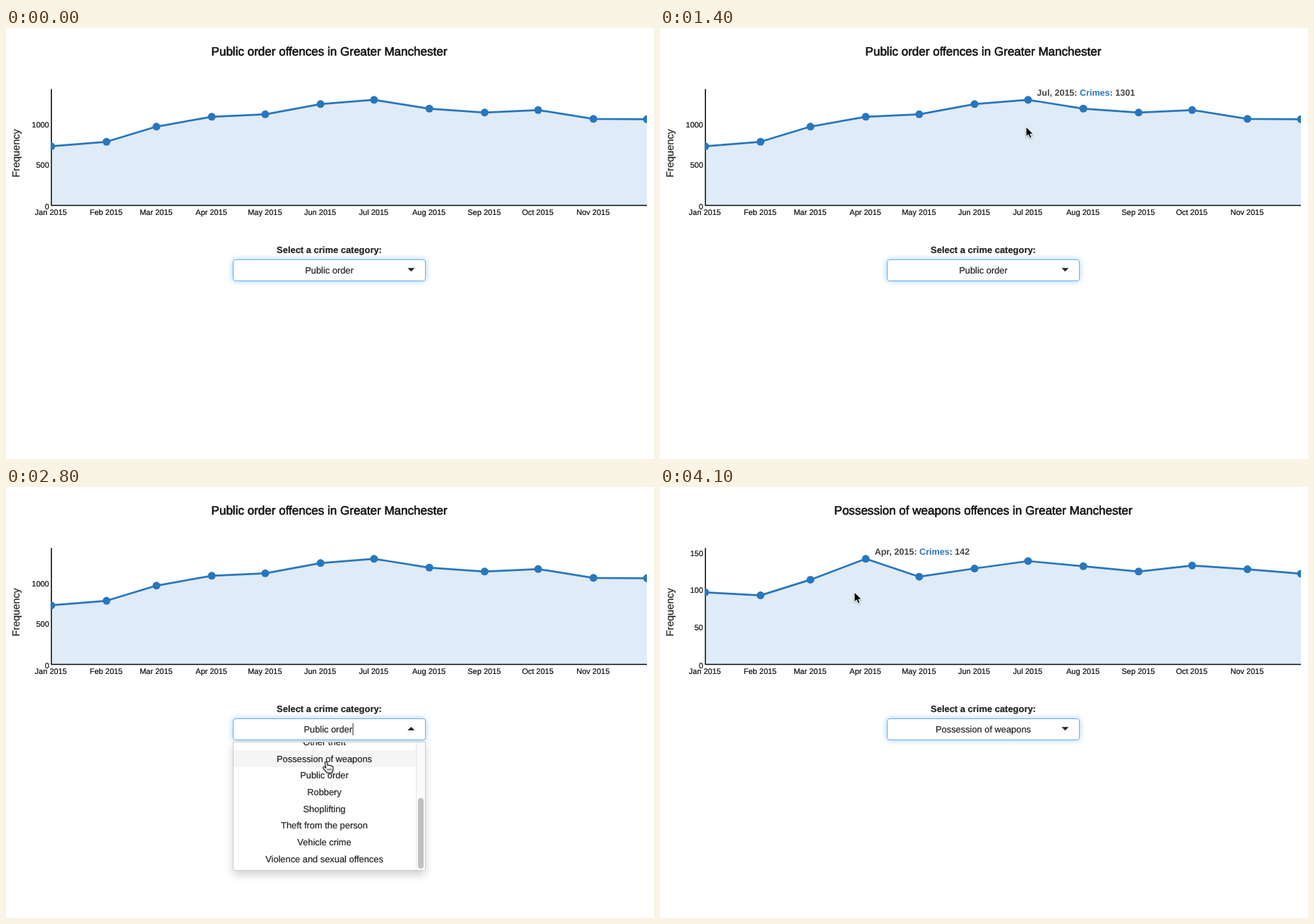
Write an HTML page that moves like this. It is 917 px wide and 611 px high and loops after 4200 ms.

```html
<!DOCTYPE html>
<html lang="en">
<head>
<meta charset="utf-8">
<title>Crime chart</title>
<style>
  html, body { margin: 0; width: 100%; height: 100%; overflow: hidden; background: #fff; }
  svg { display: block; font-family: "Liberation Sans", Arial, sans-serif; font-size: 12.85px; fill: #222; }
  text { text-rendering: geometricPrecision; stroke: #222; stroke-width: .2px; }
  .mid { text-anchor: middle; }
  .title { font-size: 17.05px; fill: #111; stroke: #111; stroke-width: .6px; text-anchor: middle; }
  .tick { font-size: 11px; fill: #000; }
  .end { text-anchor: end; }
  .label { font-size: 14.5px; text-anchor: middle; }
  .tip { font-size: 12.55px; font-weight: bold; fill: #444; stroke: none; }
  .tip tspan { fill: #2876bd; }
  .area { fill: rgba(40, 118, 198, .144); }
  .line { fill: none; stroke: #2876bd; stroke-width: 2.7; stroke-linejoin: round; }
  .dot { fill: #2876bd; }
  .axis { fill: none; stroke: #000; stroke-width: 1.5; }
  .box { fill: #fff; stroke: #66afe9; filter: drop-shadow(0 0 4px rgba(102, 175, 233, .6)); }
  .menu { fill: #fff; stroke: #ccc; filter: drop-shadow(0 6px 6px rgba(0, 0, 0, .175)); }
  #pointer { filter: drop-shadow(0 1px 1px rgba(0, 0, 0, .3)); }
</style>
</head>
<body>
<svg width="917" height="611" viewBox="0 0 917 611">
  <defs>
    <clipPath id="plot"><rect x="63.5" y="80" width="843.5" height="172"/></clipPath>
    <clipPath id="list"><rect x="321" y="362" width="273" height="181"/></clipPath>
  </defs>

  <text class="label" transform="translate(19 177.5) rotate(-90)">Frequency</text>
  <path class="axis" d="M64.3 86.5V251.5H907"/>
  <g id="charts"></g>
  <g id="months"></g>
  <g id="tips"></g>

  <text class="mid" x="457.5" y="319" font-size="12.95" font-weight="bold">Select a crime category:</text>
  <rect class="box" x="321.5" y="328.5" width="272" height="30" rx="3.5"/>
  <text id="before" class="mid" x="457.5" y="347.8">Public order</text>
  <text id="after" class="mid" x="457.5" y="347.8">Possession of weapons</text>
  <path id="down" d="M568.3 340.3h10l-5 5z"/>

  <g id="open">
    <text class="mid" x="455.7" y="347.8">Public order</text>
    <path d="M490.5 335h1v17h-1zM568.3 345h10l-5-5z"/>
    <path class="menu" d="M321.5 361.5H593.5V540a3.5 3.5 0 0 1-3.5 3.5H325a3.5 3.5 0 0 1-3.5-3.5z"/>
    <rect id="current" x="322" y="397" width="258" height="23.7" fill="#f5f5f5"/>
    <rect id="hover" x="322" y="373.3" width="258" height="23.7" fill="#f5f5f5"/>
    <g id="options" clip-path="url(#list)"></g>
    <path d="M580 362h13v178q0 3-3 3h-10z" fill="#fafafa"/>
    <path d="M580.5 362v181" stroke="#e8e8e8"/>
    <rect x="583" y="441" width="8" height="100" rx="4" fill="#c1c1c1"/>
  </g>

  <g id="pointer">
    <path id="arrow" d="M0 0V14L3.2 11.2 5.5 16.2 8 15.1 5.8 10.2H10.2z" fill="#000" stroke="#fff"/>
    <path id="beam" d="M-3-7Q0-7 0-5.5Q0-7 3-7M0-5.5V5.5M-3 7Q0 7 0 5.5Q0 7 3 7M-1.5 2h3" fill="none" stroke="#222" stroke-width="1.2"/>
    <g id="hand" fill="#fff" stroke="#111" stroke-width="1.1" stroke-linejoin="round">
      <path d="M-2.6 1.2C-3-.8-.3-1.2.2.8L1.2 5C2 3.8 4 4 4.2 5.2 5.5 4.3 7 4.8 7 6 8.4 5.6 9 6.6 9 8L8.6 11.5 7.5 15H0C-1 12.5-3.5 10.5-4.8 8.8-6 7-4 6-2.8 7L-1.2 8.4z"/>
      <path d="M1.6 9.2v3M3.8 9v3M6 9v3" stroke-width=".9"/>
    </g>
  </g>
</svg>

<script>
const LOOP = 4200, BASE = 251.8;
const names = 'Jan Feb Mar Apr May Jun Jul Aug Sep Oct Nov Dec'.split(' ');
const monthX = names.map((_, m) => 64 + 843 / 334 * (Date.UTC(2015, m) - Date.UTC(2015, 0)) / 864e5);
const order = {
  title: 'Public order', scale: 150 / 1301, ticks: [0, 500, 1000],
  data: [729, 785, 971, 1093, 1123, 1249, 1301, 1193, 1145, 1175, 1067, 1062]
};
const weapons = {
  title: 'Possession of weapons', scale: 150 / 142, ticks: [0, 50, 100, 150],
  data: [97, 93, 114, 142, 118, 129, 139, 132, 125, 133, 128, 122]
};

const byId = id => document.getElementById(id);
const add = (id, markup) => byId(id).insertAdjacentHTML('beforeend', markup);
const percent = t => (Math.max(0, t - 1) / LOOP * 100).toFixed(3) + '%';
const addStyle = css => {
  const style = document.createElement('style');
  style.textContent = css;
  document.head.append(style);
};

// Visible only during the given [from, to] spans, in ms
function show(id, ...spans) {
  let frames = '0% { visibility: hidden }';
  for (const [from, to] of spans) {
    frames += `${percent(from)} { visibility: visible }`;
    if (to < LOOP) frames += `${percent(to)} { visibility: hidden }`;
  }
  addStyle(`@keyframes ${id}-show { ${frames} }
    #${id} { animation: ${id}-show ${LOOP}ms step-end infinite }`);
}

function drawChart(id, { title, scale, ticks, data }) {
  const y = v => BASE - v * scale;
  const points = data.map((v, m) => `${monthX[m].toFixed(1)},${y(v).toFixed(1)}`).join(' ');
  add('charts', `<g id="${id}">
    <text class="title" x="457.5" y="38.5">${title} offences in Greater Manchester</text>
    ${ticks.map(v => `<text class="tick end" x="61" y="${y(v) + (v ? 4.3 : 5.2)}">${v}</text>`).join('')}
    <g clip-path="url(#plot)">
      <polygon class="area" points="64,${BASE} ${points} 907,${BASE}"/>
      <polyline class="line" points="${points}"/>
      ${data.map((v, m) => `<circle class="dot" cx="${monthX[m]}" cy="${y(v)}" r="5.5"/>`).join('')}
    </g></g>`);
}

function drawTip({ scale, data }, m, from, to) {
  const id = 'tip' + names[m];
  add('tips', `<text id="${id}" class="tip" x="${monthX[m] + 12.5}" y="${BASE - data[m] * scale - 5.5}"
    >${names[m]}, 2015: <tspan>Crimes</tspan>: ${data[m]}</text>`);
  show(id, [from, to]);
}

drawChart('order', order);
drawChart('weapons', weapons);
names.slice(0, 11).forEach((name, m) =>
  add('months', `<text class="tick mid" x="${monthX[m] - .5}" y="265">${name} 2015</text>`));
['Other theft', 'Possession of weapons', 'Public order', 'Robbery', 'Shoplifting',
  'Theft from the person', 'Vehicle crime', 'Violence and sexual offences'].forEach((name, i) =>
  add('options', `<text class="mid" x="450.5" y="${366 + i * 23.68}">${name}</text>`));

show('order', [0, 3100]);
show('weapons', [3100, LOOP]);
drawTip(order, 7, 300, 1200);
drawTip(order, 6, 1200, 1700);
drawTip(weapons, 4, 3700, 3800);
drawTip(weapons, 3, 3800, LOOP);

show('before', [0, 2000]);
show('after', [2900, LOOP]);
show('down', [0, 2000], [2900, LOOP]);
show('open', [2000, 2900]);
show('current', [2000, 2600]);
show('hover', [2600, 2900]);
show('arrow', [100, 1900], [3200, LOOP]);
show('beam', [1900, 2500]);
show('hand', [2500, 3200]);

// Pointer stops: time, x, y; it advances ten times a second
const stops = [
  [0, 588, 362], [100, 590, 322], [500, 606, 161], [900, 600, 158], [1400, 518, 140],
  [1900, 470, 343], [2400, 470, 343], [2700, 454, 390], [3100, 454, 390],
  [3500, 377, 293], [4100, 275, 149], [LOOP, 275, 149]
];
const path = stops.map(([t, x, y], i) => {
  const next = stops[i + 1];
  const easing = next ? `; animation-timing-function: steps(${(next[0] - t) / 100}, end)` : '';
  return `${t === LOOP ? '100%' : percent(t)} { transform: translate(${x}px, ${y}px)${easing} }`;
}).join('\n');
addStyle(`@keyframes move { ${path} }
  #pointer { animation: move ${LOOP}ms infinite }`);
</script>
</body>
</html>
```
